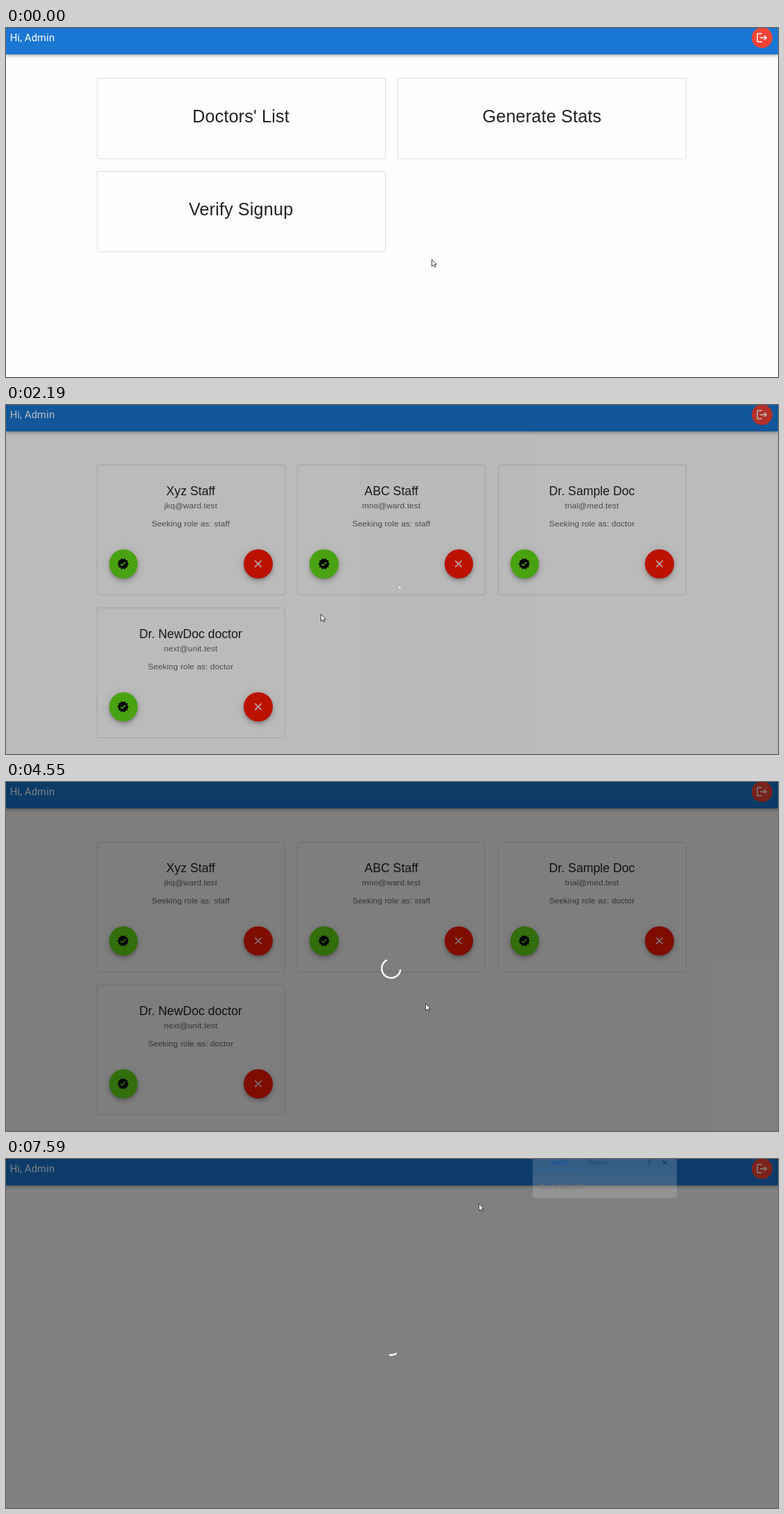
Recreate the animation shown at these times as an HTML page. Size 1114 px wide and 503 px high, loop 7.66 s.

```html
<!DOCTYPE html>
<html lang="en">
<head>
<meta charset="utf-8">
<title>Admin panel</title>
<style>
  * { box-sizing: border-box; }
  html, body { margin: 0; width: 100%; height: 100%; overflow: hidden; }
  body { position: relative; background: #fefefe; color: rgba(0,0,0,.87); font-family: "Liberation Sans", Arial, sans-serif; }
  p { position: absolute; left: 0; width: 100%; margin: 0; text-align: center; white-space: nowrap; }
  svg { display: block; }

  header {
    position: absolute; left: 0; top: 0; width: 1114px; height: 38px; background: #1976d2;
    box-shadow: 0 1.5px 3px -.7px rgba(0,0,0,.2), 0 3px 3.7px rgba(0,0,0,.14), 0 .7px 7.4px rgba(0,0,0,.12);
  }
  header span {
    position: absolute; left: 5.7px; top: 4px; color: #fff;
    font: 14.8px/21px Roboto, sans-serif; letter-spacing: .0075em;
  }
  .round { position: absolute; display: grid; place-items: center; border-radius: 50%; }
  .round svg { width: 17.8px; height: 17.8px; }
  .logout { left: 1076px; top: -1px; width: 30px; height: 30px; background: #f44336; color: #fff; }

  .card { position: absolute; border: 1px solid rgba(0,0,0,.12); border-radius: 3px; background: #fefefe; }
  #home .card { width: 417px; height: 117px; }
  #home p { top: 35px; font-size: 25.16px; line-height: 38px; letter-spacing: .00735em; }
  #list .card { width: 272px; height: 188px; }
  .name { top: 25px; font-size: 17.7px; line-height: 24px; }
  .info { font-size: 11.84px; line-height: 18px; letter-spacing: .00938em; color: rgba(0,0,0,.6); }
  .mail { top: 49px; }
  .role { top: 75.5px; }
  .fab {
    top: 121.5px; width: 41.5px; height: 41.5px;
    box-shadow: 0 2.2px 3.7px -.7px rgba(0,0,0,.2), 0 4.4px 7.4px rgba(0,0,0,.14), 0 .7px 13.3px rgba(0,0,0,.12);
  }
  .accept { left: 17px; background: #64dd17; color: #000; }
  .reject { right: 17px; background: #ff1800; color: #fff; }
  .fab.pressed { box-shadow: 0 5.2px 6px -3px rgba(0,0,0,.2), 0 8.9px 12.6px 1.5px rgba(0,0,0,.14), 0 3.7px 16px 3px rgba(0,0,0,.12); }

  #backdrop { position: absolute; inset: 0; background: rgba(0,0,0,.5); }
  #backdrop svg { position: absolute; left: 541.2px; top: 254.2px; width: 29.6px; height: 29.6px; }

  #dialog {
    position: absolute; left: 390px; top: 0; width: 331px; height: 90px; background: #fff;
    border-radius: 0 0 6px 6px; box-shadow: 0 1px 3px rgba(0,0,0,.3); font-family: Roboto, sans-serif;
  }
  #dialog p { left: 15px; text-align: left; }
  #dialog b {
    position: absolute; right: 12px; bottom: 11px; width: 48px; height: 24px; border-radius: 3px;
    background: #1a73e8; color: #fff; font: 500 10px/24px Roboto, sans-serif; text-align: center;
  }

  #popup {
    position: absolute; left: 760px; top: 0; width: 208px; height: 56px; overflow: hidden;
    border-radius: 0 0 3px 3px; background: rgba(255,255,255,.17); font: 9px/12px Roboto, sans-serif;
  }
  #popup span { position: absolute; white-space: nowrap; }
  #popup .tab { top: -1px; font-weight: 700; color: #17599f; }
  #popup .line { left: 10px; top: 15px; width: 56px; height: 1px; background: #1b64b0; }
  #popup .foot { left: 0; top: 22px; width: 208px; height: 34px; background: rgba(120,120,120,.1); }
  #popup svg { position: absolute; left: 0; top: 0; }

  #cursor { position: absolute; left: 0; top: 0; overflow: visible; }
</style>
</head>
<body>
<svg width="0" height="0" style="position:absolute">
  <symbol id="exit" viewBox="0 0 24 24"><path fill="currentColor" d="m17 7-1.41 1.41L18.17 11H8v2h10.17l-2.58 2.58L17 17l5-5zM4 5h8V3H4c-1.1 0-2 .9-2 2v14c0 1.1.9 2 2 2h8v-2H4z"/></symbol>
  <symbol id="cross" viewBox="0 0 24 24"><path stroke="currentColor" stroke-width="2" d="M5.7 5.7 18.3 18.3M18.3 5.7 5.7 18.3"/></symbol>
  <symbol id="badge" viewBox="0 0 24 24"><path fill="currentColor" d="m23 12-2.44-2.79.34-3.69-3.61-.82-1.89-3.2L12 2.96 8.6 1.5 6.71 4.69 3.1 5.5l.34 3.7L1 12l2.44 2.79-.34 3.7 3.61.82L8.6 22.5l3.4-1.47 3.4 1.46 1.89-3.19 3.61-.82-.34-3.69zm-12.91 4.72-3.8-3.81 1.48-1.48 2.32 2.33 5.85-5.87 1.48 1.48z"/></symbol>
</svg>

<main id="home"></main>
<main id="list"></main>
<header>
  <span>Hi, Admin</span>
  <div class="round logout"><svg><use href="#exit"/></svg></div>
</header>

<div id="backdrop">
  <svg viewBox="22 22 44 44">
    <circle id="arc" cx="44" cy="44" r="20.2" fill="none" stroke="#fff" stroke-width="3.6"/>
  </svg>
</div>

<div id="dialog">
  <p style="top:10px;font-size:11px">This page says</p>
  <p style="top:32px;font-size:9.6px;color:#5f6368">Signup rejected</p>
  <b>OK</b>
</div>

<div id="popup">
  <span class="foot"></span>
  <span class="tab" style="left:25px">Arabic</span>
  <span class="tab" style="left:80px;color:#2a4f78">English</span>
  <span class="line"></span>
  <span style="left:11px;top:34px;font-size:8.5px;color:#777">Tovela Wordshift</span>
  <svg width="208" height="20" fill="#1c3a58" stroke="#1c3a58">
    <path d="M168.5 1v8" stroke-width="2" stroke-dasharray="2 1.5"/>
    <path d="m188 2 6 6m0-6-6 6" stroke-width="1.2"/>
  </svg>
</div>

<svg id="cursor" width="9" height="13">
  <path d="M.5.5v10l2.4-2.1 1.5 3.3 1.6-.7-1.5-3.2h2.9z" fill="#fff" stroke="#2b2b38" stroke-width=".9"/>
</svg>

<script>
const LOOP = 7660;
const $ = id => document.getElementById(id);

const place = (x, y, body) => `<div class="card" style="left:${x}px;top:${y}px">${body}</div>`;

$('home').innerHTML = ["Doctors' List", 'Generate Stats', 'Verify Signup'].map((title, i) =>
  place(130.5 + i % 2 * 434.4, 72 + (i >> 1) * 134, `<p>${title}</p>`)).join('');

const people = [
  ['Xyz Staff', 'jkq@ward.test', 'staff'],
  ['ABC Staff', 'mno@ward.test', 'staff'],
  ['Dr. Sample Doc', 'trial@med.test', 'doctor'],
  ['Dr. NewDoc doctor', 'next@unit.test', 'doctor'],
];
$('list').innerHTML = people.map(([name, mail, role], i) =>
  place(130.5 + i % 3 * 289.5, 85.6 + Math.floor(i / 3) * 206, `
    <p class="name">${name}</p>
    <p class="info mail">${mail}</p>
    <p class="info role">Seeking role as: ${role}</p>
    <div class="round fab accept"><svg><use href="#badge"/></svg></div>
    <div class="round fab reject"><svg><use href="#cross"/></svg></div>`)).join('');

const verifyCard = $('home').children[2];
const rejectButton = $('list').children[2].querySelector('.reject');

const clamp = v => Math.min(1, Math.max(0, v));

// cubic-bezier(x1, 0, x2, 1)
const bezier = (x1, x2) => p => {
  let lo = 0, hi = 1, u = .5;
  for (let i = 0; i < 20; i++) {
    const x = 3 * u * (1 - u) * ((1 - u) * x1 + u * x2) + u ** 3;
    if (x < p) lo = u; else hi = u;
    u = (lo + hi) / 2;
  }
  return u * u * (3 - 2 * u);
};
const fadeEase = bezier(.4, .2);
const dashEase = bezier(.42, .58);

const loaders = [
  { start: 868, show: 890, end: 2125 },
  { start: 3605, show: 3765, end: 6180 },
  { start: 7400, show: 7405, end: LOOP },
];

// time, x, y of the pointer tip
const path = [
  [0, 614, 333], [70, 614, 333], [300, 570, 322], [600, 470, 299], [820, 431, 290], [1500, 431, 290],
  [2190, 453, 301], [2460, 622, 323], [2800, 800, 300], [3140, 925, 261], [3280, 928, 240],
  [3630, 930, 232], [3760, 930, 232], [4200, 740, 285], [4550, 605, 319], [4950, 606, 316], [5290, 640, 235],
  [5750, 696, 70], [6100, 684, 62], [6190, 682, 63], [7199, 682, 63], [7200, 682, 64], [LOOP, 682, 64],
];

function pointerAt(t) {
  const i = path.findIndex(point => point[0] > t);
  const [t0, x0, y0] = path[i - 1], [t1, x1, y1] = path[i];
  const p = (t - t0) / (t1 - t0);
  return [x0 + (x1 - x0) * p, y0 + (y1 - y0) * p];
}

function drawLoader(t) {
  const loader = loaders.find(l => t >= l.show && t < l.end + 195);
  $('backdrop').style.opacity = loader
    ? fadeEase(clamp((t - loader.start) / 225)) * (1 - fadeEase(clamp((t - loader.end) / 195)))
    : 0;
  if (!loader) return;
  const turn = (t - loader.start) / 1400 % 1;
  const grow = dashEase(clamp(turn * 2));
  const shrink = dashEase(clamp(turn * 2 - 1));
  $('arc').setAttribute('stroke-dasharray', `${1 + 99 * grow} 200`);
  $('arc').setAttribute('stroke-dashoffset', -15 * grow - 110 * shrink);
  $('arc').setAttribute('transform', `rotate(${turn * 360} 44 44)`);
}

const show = (id, on) => { $(id).style.visibility = on ? 'visible' : 'hidden'; };

function draw(t) {
  const [x, y] = pointerAt(t);
  $('cursor').style.transform = `translate(${Math.round(x)}px, ${Math.round(y)}px)`;

  show('home', t < 890);
  show('list', t >= 2125 && t < 7405);
  show('dialog', t >= 4900 && t < 6180);

  const hover = clamp((t - 380) / 150);
  verifyCard.style.boxShadow = `0 6px 13px rgba(0,0,0,${.2 * hover})`;
  rejectButton.classList.toggle('pressed', t >= 3420 && t < 3765);
  $('popup').style.opacity = clamp((t - 7500) / 90);
  drawLoader(t);
}

const begin = performance.now();
function tick(now) {
  draw(Math.max(0, now - begin) % LOOP);
  requestAnimationFrame(tick);
}
draw(0);
requestAnimationFrame(tick);
</script>
</body>
</html>
```
